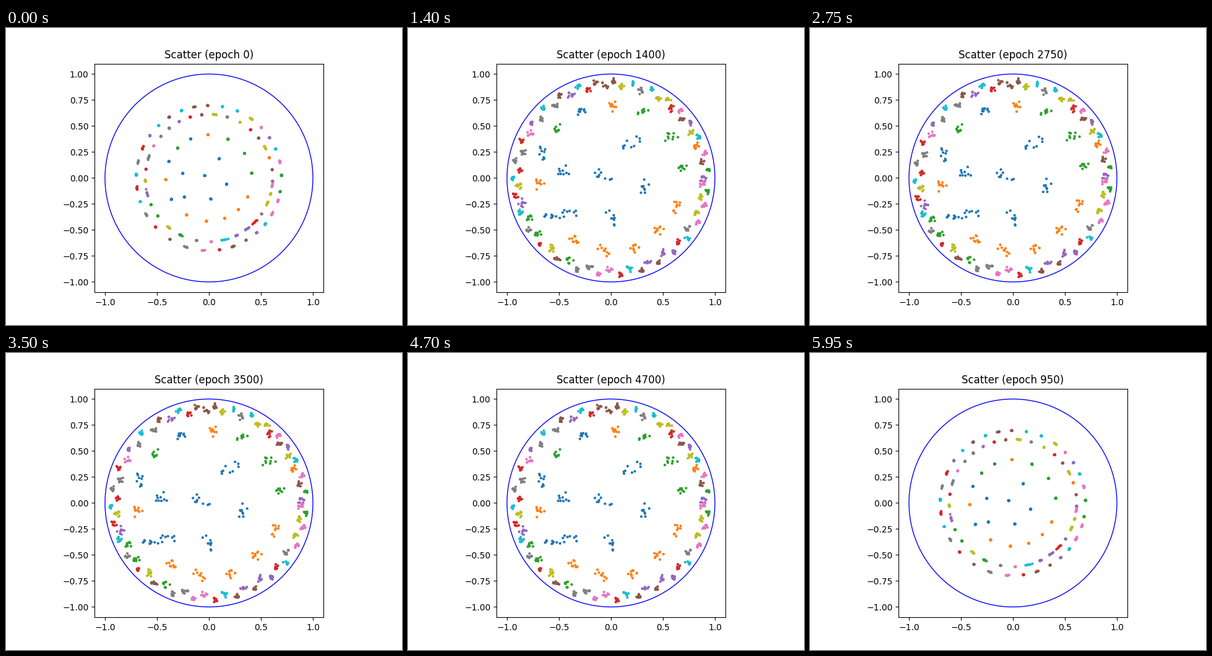
A matplotlib script for the animation above (6000 ms loop, 640 by 480 pixels).

```python
import numpy as np
import matplotlib.pyplot as plt
from matplotlib.animation import FuncAnimation

FRAMES, INTERVAL, STEP = 120, 50, 50
MAIN_FRAMES = 100      # the remaining frames show the burn-in run
KIDS = 9

# Colour cycle numbers, counter-clockwise along the two rings.
RIM = [4, 2, 5, 6, 1, 9, 8, 4, 5, 6, 3, 8, 8, 9, 7, 9, 8, 5, 5, 5, 3, 9,
       4, 5, 7, 9, 7, 4, 6, 3, 7, 7, 3, 9, 8, 3, 4, 9, 2, 7, 2, 3, 8, 5,
       2, 7, 7, 6, 6, 3, 9, 5, 4, 5, 4, 4, 3, 9, 7, 6, 8, 6, 8, 2, 6]
MIDDLE = [2, 2, 2, 1, 0, 2, 0, 1, 0, 1, 1, 1, 1, 1]
CORE = np.array([.20 + .34j, .33 - .09j, -.38j, -.42 - .34j,
                 -.47 + .04j, -.08 + .04j])

rng = np.random.default_rng(11)


def polar(r, degrees):
    return r * np.exp(1j * np.radians(degrees))


def noise(*shape, cut=1.7):
    return np.clip(rng.normal(size=shape), -cut, cut)


def shrink(z, factor):
    """Scale the hyperbolic distance from the centre."""
    r = np.abs(z)
    return z / r * np.tanh(factor * np.arctanh(r))


def limit(z, rmax):
    return z * np.minimum(1, rmax / np.maximum(np.abs(z), 1e-6))


# Settled cluster centres: zigzag rim, middle ring, loose core.
slot = np.arange(len(RIM))
rim_angle = np.interp(slot, [0, 4, 11, 21, 31, 41, 51, 61, 65],
                      [2, 22, 53, 108, 172, 223, 286, 346, 362])
rim = polar(np.where(slot % 2, .935, .885), rim_angle)
middle = polar(.70, 11 + 25.1 * np.arange(len(MIDDLE)))
settled = np.concatenate([CORE, middle, rim])[:, None]
colors = [f"C{c}" for c in [0] * len(CORE) + MIDDLE + RIM for _ in range(KIDS)]

count = len(settled)
turn = 5 * np.cos(2 * np.angle(settled))     # slow relaxation, in degrees
opened = settled * polar(1, -turn)
packed = shrink(opened, .51)

# Children: clouds that get smaller and rounder towards the rim.
room = 1 - np.abs(settled) ** 2
size = np.minimum(.007 + .046 * room, .04)
tilt = polar(1, rng.uniform(0, 180, (count, 1)))
cloud = size * tilt * ((1 + .4 * room) * noise(count, KIDS)
                       + 1j * (1 - .4 * room) * noise(count, KIDS))

# Packed children: tight dots, a few of them smeared along the rim.
smear = .02 * rng.random((count, 1)) ** 3 * (np.abs(packed) > .6)
tangent = 1j * packed / np.abs(packed)
dot = (.0025 * (noise(count, KIDS) + 1j * noise(count, KIDS))
       + tangent * smear * noise(count, KIDS))
stray = noise(count, KIDS) + 1j * noise(count, KIDS)


def training(t):
    opening = 1 - np.exp(-t / 110)
    pending = np.exp(-max(t - 550, 0) / 1100)
    center = settled * polar(1, -turn * pending)
    return limit(packed + dot + (center + cloud - packed - dot) * opening, .96)


def burn_in(t):
    grow = .01 + .99 * (1 - np.exp(-t / 60))
    return limit((packed + dot + .14 * stray * np.exp(-t / 180)) * grow, .85)


fig, ax = plt.subplots(figsize=(6.4, 4.8), dpi=100)
ax.set_aspect("equal")
ax.set_xlim(-1.1, 1.1)
ax.set_ylim(-1.1, 1.1)
ax.add_patch(plt.Circle((0, 0), 1, color="blue", fill=False))
dots = ax.scatter(np.zeros(count * KIDS), np.zeros(count * KIDS),
                  s=4, c=colors)
title = ax.set_title("Scatter (epoch 0)")


def update(i):
    epoch = i % MAIN_FRAMES * STEP
    pose = training if i < MAIN_FRAMES else burn_in
    z = pose(epoch).ravel()
    dots.set_offsets(np.column_stack([z.real, z.imag]))
    title.set_text(f"Scatter (epoch {epoch})")
    return dots, title


anim = FuncAnimation(fig, update, frames=FRAMES, interval=INTERVAL,
                     repeat=True, repeat_delay=0, blit=False)
plt.show()
```
